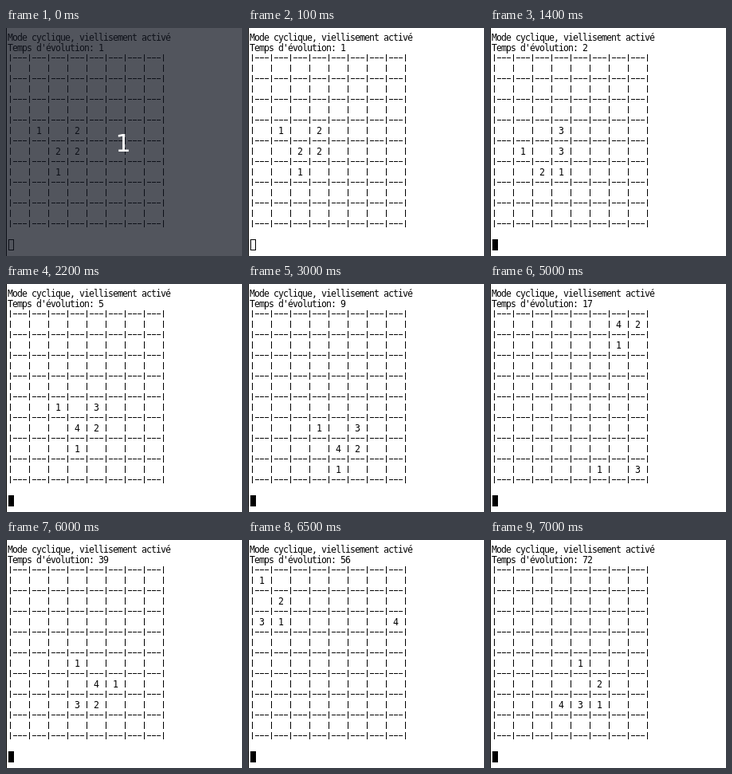
These frames come from a looping animation (296 by 286 pixels, 8 s). An HTML page with a canvas:

```html
<!DOCTYPE html>
<html lang="fr">
<head>
<meta charset="utf-8">
<title>Jeu de la vie</title>
<style>
  html, body { margin: 0; width: 100%; height: 100%; overflow: hidden; background: #fff; }
  canvas { display: block; }
</style>
</head>
<body>
<canvas id="stage" width="296" height="286"></canvas>
<script>
const ctx = document.getElementById('stage').getContext('2d');
const WIDTH = 296, HEIGHT = 286, LOOP = 8000;
const SIZE = 8, LAST_GENERATION = 72;
const LEFT = 3, CHAR = 6, LINE = 13;

// Times at which generations 2, 3, 4... appear while stepping by hand
const STEPS = [1400, 1600, 2000, 2200, 2400, 2700, 2900, 3000,
               3300, 3500, 3600, 3900, 4200, 4400, 4600, 5000];
const FAST_START = 5400;

function evolve(grid) {
  const at = (r, c) => grid[(r + SIZE) % SIZE * SIZE + (c + SIZE) % SIZE];
  return grid.map((age, i) => {
    const r = Math.floor(i / SIZE), c = i % SIZE;
    let neighbours = 0;
    for (let dr = -1; dr <= 1; dr++)
      for (let dc = -1; dc <= 1; dc++)
        if ((dr || dc) && at(r + dr, c + dc)) neighbours++;
    const alive = neighbours === 3 || (age && neighbours === 2);
    return alive ? age + 1 : 0;
  });
}

const seed = new Array(SIZE * SIZE).fill(0);
for (const [r, c, age] of [[3, 1, 1], [3, 3, 2], [4, 2, 2], [4, 3, 2], [5, 2, 1]])
  seed[r * SIZE + c] = age;
const history = [null, seed];
while (history.length <= LAST_GENERATION) history.push(evolve(history.at(-1)));

function generationAt(t) {
  if (t < FAST_START) return 1 + STEPS.filter(s => s <= t).length;
  const tick = Math.floor(t / 100) - 60;
  return Math.min(LAST_GENERATION, 39 + Math.round(tick * 3.3));
}

// Terminal text: one character per 6 x 13 cell
function print(text, column, line) {
  [...text].forEach((ch, i) =>
    ctx.fillText(ch, LEFT + (column + i) * CHAR + 2.5, 16 + line * LINE));
}

function drawTable() {
  for (let row = 0; row <= SIZE * 2; row++) {
    const top = 33 + row * LINE;
    for (let c = 0; c <= SIZE; c++) {
      const x = LEFT + c * 4 * CHAR;
      ctx.fillRect(x + 2, top, 1, 9);
      if (row % 2 || c === SIZE) continue;
      for (let d = 1; d <= 3; d++) ctx.fillRect(x + d * CHAR, top + 4, 5, 1);
    }
  }
}

function drawCursor(filled) {
  ctx.fillRect(3, 265, 7, 14);
  if (filled) return;
  ctx.fillStyle = '#fff';
  ctx.fillRect(4, 266, 5, 12);
}

function drawCountdown() {
  ctx.fillStyle = 'rgba(19, 23, 34, 0.73)';
  ctx.fillRect(0, 0, WIDTH, HEIGHT);
  ctx.fillStyle = '#fff';
  ctx.font = '30px "DejaVu Sans", sans-serif';
  ctx.fillText('1', 147, 155);
}

function draw(t) {
  const generation = generationAt(t);
  ctx.fillStyle = '#fff';
  ctx.fillRect(0, 0, WIDTH, HEIGHT);
  ctx.fillStyle = '#000';
  ctx.fillRect(0, 0, 1, HEIGHT);
  ctx.font = '11.5px "DejaVu Sans Mono", monospace';
  ctx.textAlign = 'center';
  print('Mode cyclique, viellisement activé', 0, 0);
  print("Temps d'évolution: " + generation, 0, 1);
  drawTable();
  history[generation].forEach((age, i) => {
    if (age) print(String(age), i % SIZE * 4 + 2, 3 + 2 * Math.floor(i / SIZE));
  });
  drawCursor(t >= 500);
  if (t < 100) drawCountdown();
}

const start = performance.now();
function frame() {
  draw((performance.now() - start) % LOOP);
  requestAnimationFrame(frame);
}
frame();
</script>
</body>
</html>
```
